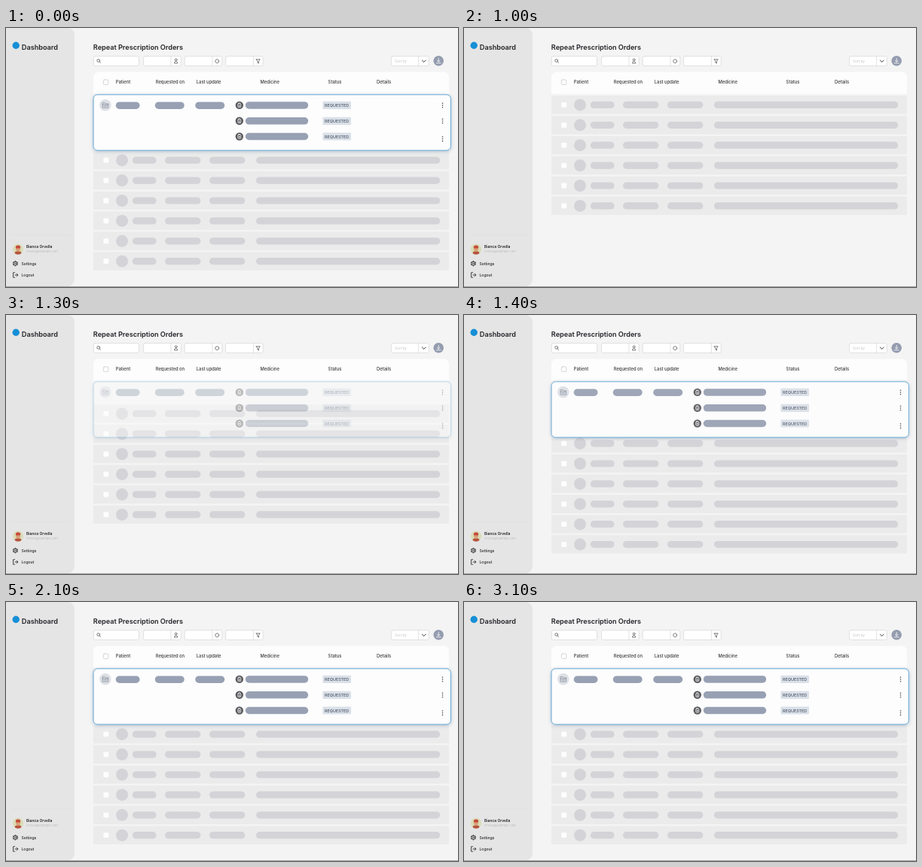
An HTML page with a canvas that plays this animation: 600x345 px, repeating every 3.3 s.

```html
<!DOCTYPE html>
<html lang="en">
<head>
<meta charset="utf-8">
<title>Dashboard</title>
<style>
  html, body { margin: 0; width: 100%; height: 100%; overflow: hidden; background: #f4f4f4; }
  canvas { position: absolute; left: 0; top: 0; width: 600px; height: 345px; }
</style>
</head>
<body>
<canvas id="page"></canvas>
<canvas id="card"></canvas>
<script>
const W = 600, H = 345, LOOP = 3300;
const ROWS = 6, PITCH = 26.9, FIRST_Y = 102.4, PUSH = 73.8;
const INK = '#222327', SLATE = '#98a1b3';

function layer(id) {
  const canvas = document.getElementById(id);
  const scale = window.devicePixelRatio || 1;
  canvas.width = W * scale;
  canvas.height = H * scale;
  const c = canvas.getContext('2d');
  c.scale(scale, scale);
  return c;
}

const page = layer('page'), card = layer('card');

function box(c, x, y, w, h, r, fill, stroke, line = 0.8) {
  c.beginPath();
  c.roundRect(x, y, w, h, r);
  if (fill) { c.fillStyle = fill; c.fill(); }
  if (stroke) { c.strokeStyle = stroke; c.lineWidth = line; c.stroke(); }
}

function dot(c, x, y, r, fill) {
  c.beginPath();
  c.arc(x, y, r, 0, Math.PI * 2);
  c.fillStyle = fill;
  c.fill();
}

function ring(c, x, y, r, color, line = 0.8) {
  c.beginPath();
  c.arc(x, y, r, 0, Math.PI * 2);
  c.strokeStyle = color;
  c.lineWidth = line;
  c.stroke();
}

function path(c, d, color, line = 0.8) {
  c.strokeStyle = color;
  c.lineWidth = line;
  c.lineCap = c.lineJoin = 'round';
  c.stroke(new Path2D(d));
}

function text(c, str, x, y, size, weight = 500, color = INK) {
  c.font = `${weight} ${size}px Inter, Arial, sans-serif`;
  c.fillStyle = color;
  c.fillText(str, x, y);
}

function pill(c, x1, x2, y, color, h = 9.2) {
  box(c, x1, y - h / 2, x2 - x1, h, h / 2, color);
}

function drawAvatar(c) {
  c.save();
  c.beginPath();
  c.arc(16, 294.8, 7, 0, Math.PI * 2);
  c.clip();
  c.fillStyle = '#d9dcb4';
  c.fillRect(9, 287, 14, 16);
  box(c, 11.5, 297.6, 9, 6, 3, '#b6533f');
  dot(c, 16, 294.4, 2.9, '#d9a078');
  box(c, 12.8, 289.6, 6.4, 3.8, [3, 3, 1, 1], '#c64a3d');
  c.restore();
}

function drawSidebar(c) {
  box(c, 0, 0, 91, 344, [0, 9, 9, 0], '#e5e5e5');
  dot(c, 13.2, 23.2, 4.7, '#168fd6');
  text(c, 'Dashboard', 20.8, 28.7, 9.15, 600);
  path(c, 'M8 276H84', '#dcdcdc', 0.6);

  drawAvatar(c);
  text(c, 'Bianca Orvella', 27, 293.4, 4.95, 600);
  text(c, 'orvella@example.com', 27, 299.2, 4, 400, '#bcbcbf');

  ring(c, 12.4, 313.7, 2.7, INK, 0.9);
  ring(c, 12.4, 313.7, 1, INK, 0.7);
  for (let i = 0; i < 6; i++) {
    const a = (i + 0.5) * Math.PI / 3;
    dot(c, 12.4 + 3 * Math.cos(a), 313.7 + 3 * Math.sin(a), 0.6, INK);
  }
  text(c, 'Settings', 20.5, 315.7, 5.05);

  path(c, 'M11.7 325.8H9.5V332.2H11.7M11.8 329H15.8M14.1 327.2L15.9 329L14.1 330.8', INK, 0.8);
  text(c, 'Logout', 20.5, 331, 5.05);
}

function drawFilter(c, x, w, split) {
  box(c, x, 37.6, w, 12.8, 2, '#fff', '#dadada', 0.8);
  if (split) path(c, `M${split} 37.6V50.4`, '#d6d6d6', 0.7);
}

function drawToolbar(c) {
  text(c, 'Repeat Prescription Orders', 115.8, 28.8, 9.15, 600);
  drawFilter(c, 116.3, 60.2);
  ring(c, 122.7, 43.4, 1.9, '#444', 0.7);
  path(c, 'M124.1 44.8L125.6 46.3', '#444', 0.7);

  drawFilter(c, 182.6, 49.6, 219);
  ring(c, 225.6, 42.4, 1.4, '#444', 0.7);
  path(c, 'M223.5 46.6C223.5 43.6 227.7 43.6 227.7 46.6Z', '#444', 0.7);

  drawFilter(c, 237.2, 49.6, 274);
  c.setLineDash([3.2, 0.8]);
  ring(c, 280.2, 44.2, 2.5, '#444', 0.7);
  c.setLineDash([]);

  drawFilter(c, 291.6, 49.6, 328.4);
  path(c, 'M332.2 41.8H337.2L335.4 44.4V47L334 46.2V44.4Z', '#444', 0.7);

  drawFilter(c, 511.7, 49.6, 547.6);
  text(c, 'Sort by', 516, 45.7, 4.7, 400, '#c3c3c6');
  path(c, 'M552.4 43L554.8 45.4L557.2 43', '#333', 1);

  dot(c, 574.2, 43.8, 6.8, '#949caf');
  path(c, 'M574.2 40.5V45M572.4 43.3L574.2 45.1L576 43.3M571.3 46.8H577.1', '#fff', 0.8);
}

function drawHeader(c) {
  box(c, 116, 58.5, 472, 29.2, [7, 7, 0, 0], '#fdfdfd');
  box(c, 129.4, 69, 6.4, 6.4, 1, '#fff', '#c4c4c6', 0.7);
  const heads = { Patient: 145.8, 'Requested on': 198.7, 'Last update': 252.8,
                  Medicine: 337.4, Status: 427.6, Details: 492.1 };
  for (const name in heads) text(c, name, heads[name], 74.3, 5.85, 500, '#38393d');
}

function drawRow(c, y) {
  box(c, 116, y - 12.3, 472, 24.4, 1, '#ebebeb');
  box(c, 129.4, y - 3.4, 6.8, 6.8, 1, '#fdfdfd');
  dot(c, 154, y, 8, '#d4d4d8');
  for (const [a, b] of [[167.8, 199.6], [211, 258.4], [270, 317.4], [332, 576.2]])
    pill(c, a, b, y, '#d4d4d8');
}

function drawCard(c) {
  c.save();
  c.shadowColor = 'rgba(70,110,150,0.42)';
  c.shadowBlur = 5 * (window.devicePixelRatio || 1);
  c.shadowOffsetY = 1;
  box(c, 116, 88.8, 474.4, 74.2, 5.5, '#fff');
  c.restore();
  box(c, 116, 88.8, 474.4, 74.2, 5.5, '#fdfdfe', '#64a6d2', 1);

  dot(c, 131.8, 102.7, 7.7, '#dde0e5');
  path(c, 'M128.2 105.7V99.7H131L132 100.9H135.6V105.7ZM128.2 102.3H135.6', '#858d9c', 0.8);
  path(c, 'M130.4 104.1H133.6', '#858d9c', 0.7);
  for (const [a, b] of [[145.7, 177.5], [197.8, 236.7], [251.2, 290.2]])
    pill(c, a, b, 103.2, SLATE, 9.5);

  [[102.9, 103], [123.8, 124], [144.5, 147.8]].forEach(([y, menuY]) => {
    dot(c, 309.8, y, 5.2, '#57585c');
    box(c, 307.8, y - 2.3, 4, 5, 0.6, null, '#fff', 0.7);
    path(c, `M309 ${y - 2.8}H310.6M309 ${y}H310.6M309 ${y + 1.3}H310.6`, '#fff', 0.7);
    pill(c, 317.8, 401.2, y, SLATE, 9.5);
    box(c, 420.4, y - 5.1, 37.6, 10.2, 1, '#dae0e8');
    text(c, 'REQUESTED', 423, y + 2, 5.4, 500, '#4d5768');
    for (const d of [-2.8, 0, 2.8]) dot(c, 579.5, menuY + d, 0.8, '#3c3d42');
  });
}

// Quintic ease in and out, shown in 100 ms steps
function openness(t) {
  if (t < 100) return 1;
  const step = Math.floor(t / 100) * 100;
  const u = Math.min(1, Math.max(0, (step - 1045) / 535));
  return u < 0.5 ? 16 * u ** 5 : 1 - 16 * (1 - u) ** 5;
}

function drawPage(c, open) {
  c.fillStyle = '#f4f4f4';
  c.fillRect(0, 0, W, H);
  drawSidebar(c);
  drawToolbar(c);
  for (let i = 0; i < ROWS; i++) drawRow(c, FIRST_Y + i * PITCH + open * PUSH);
  drawHeader(c);
  c.fillStyle = '#a2a2a4';
  c.fillRect(0, 344, W, 1);
}

const start = performance.now();
let shown = -1;

function tick() {
  const open = openness((performance.now() - start) % LOOP);
  if (open !== shown) {
    drawPage(page, open);
    card.canvas.style.opacity = open;
    shown = open;
  }
  requestAnimationFrame(tick);
}

drawCard(card);
tick();
</script>
</body>
</html>
```
